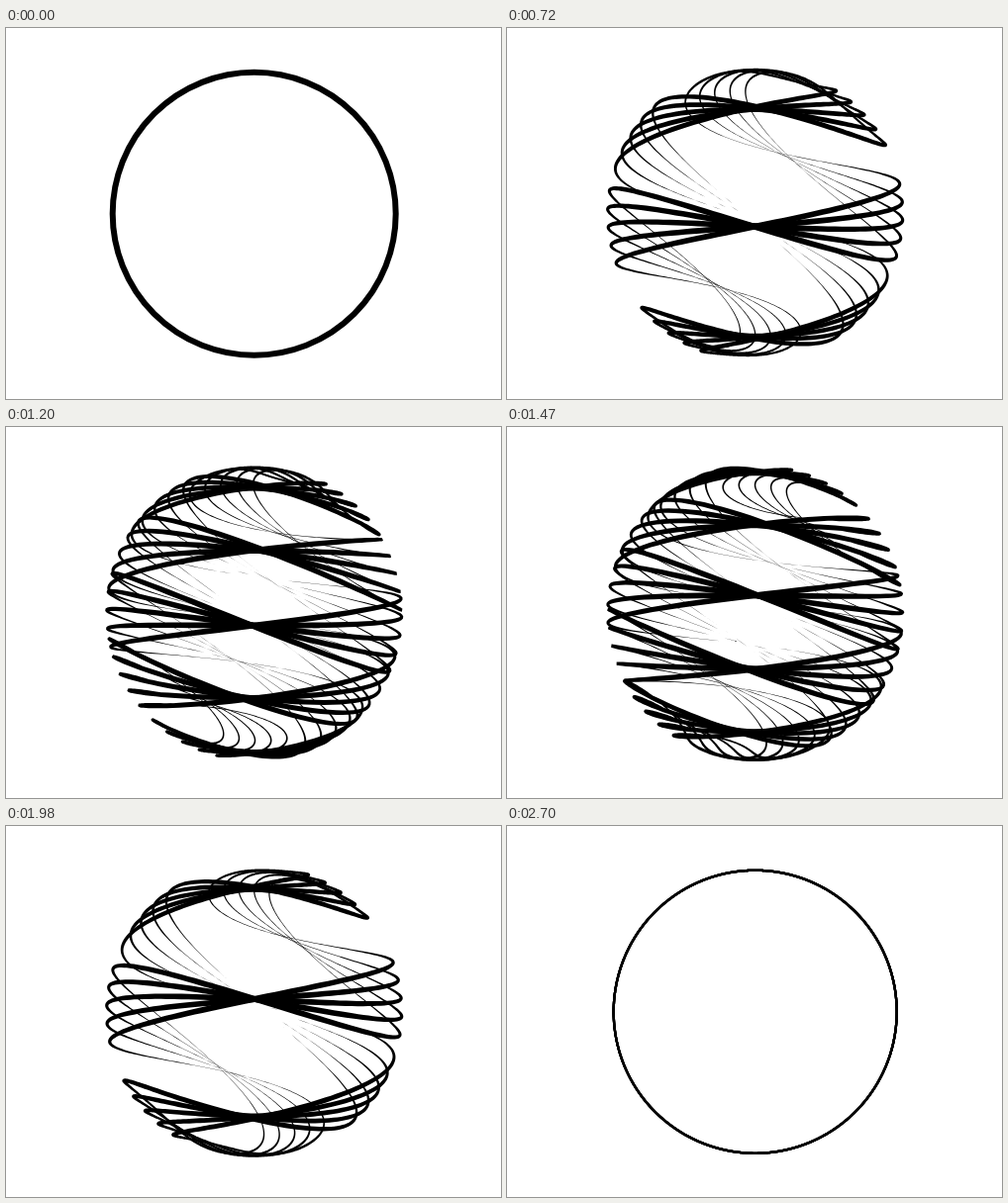
Write an HTML page with a canvas that moves like this. It is 500x375 px and loops after 2730 ms.

```html
<!DOCTYPE html>
<html>
<head>
<meta charset="utf-8">
<style>
  html, body { margin: 0; height: 100%; overflow: hidden; background: #fff; }
  canvas { display: block; }
</style>
</head>
<body>
<canvas width="500" height="375"></canvas>
<script>
const ctx = document.querySelector('canvas').getContext('2d');
const TAU = 2 * Math.PI;
const RADIUS = 143, PERSPECTIVE = 0.283;
const STRANDS = 5, STRAND_STEP = TAU / 50;
const POINTS = 720, TURNS = 3, TWIST_RATE = 0.967;
const STEP_MS = 30, STEPS = 91;

// A circle whose points are turned about the vertical axis, more with height.
function twistedPoint(angle, t) {
  const c = Math.cos(angle), y = Math.sin(angle);
  const twist = TAU * TURNS * (t + TWIST_RATE * Math.min(t, 1 - t) * y);
  const z = -c * Math.sin(twist);
  const scale = RADIUS / (1 - PERSPECTIVE * z);
  return { x: c * Math.cos(twist) * scale, y: -y * scale, half: 1.15 * (1 + z) ** 1.35 };
}

// One ribbon, wider towards the viewer.
function ribbon(t) {
  const pts = Array.from({ length: POINTS }, (_, i) => twistedPoint(i / POINTS * TAU, t));
  const edges = pts.map((p, i) => {
    const a = pts[(i + POINTS - 1) % POINTS], b = pts[(i + 1) % POINTS];
    const len = Math.hypot(b.x - a.x, b.y - a.y) || 1;
    const nx = (a.y - b.y) / len * p.half, ny = (b.x - a.x) / len * p.half;
    return [p.x + nx, p.y + ny, p.x - nx, p.y - ny];
  });
  const path = new Path2D();
  edges.forEach((e, i) => {
    const f = edges[(i + 1) % POINTS];
    path.moveTo(e[0], e[1]);
    path.lineTo(f[0], f[1]);
    path.lineTo(f[2], f[3]);
    path.lineTo(e[2], e[3]);
    path.closePath();
  });
  return path;
}

function draw(step) {
  ctx.setTransform(1, 0, 0, 1, 0, 0);
  ctx.fillStyle = '#fff';
  ctx.fillRect(0, 0, 500, 375);
  ctx.fillStyle = '#000';
  ctx.translate(250.7, 187.8);
  if (step === 0) {
    ctx.lineWidth = 6;
    ctx.beginPath();
    ctx.arc(0, 0, RADIUS, 0, TAU);
    ctx.stroke();
    return;
  }
  const path = ribbon(step / (STEPS - 1));
  for (let i = 0; i < STRANDS; i++) {
    ctx.fill(path);
    ctx.rotate(STRAND_STEP);
  }
}

function tick() {
  draw(Math.floor(performance.now() / STEP_MS) % STEPS);
  requestAnimationFrame(tick);
}
tick();
</script>
</body>
</html>
```
